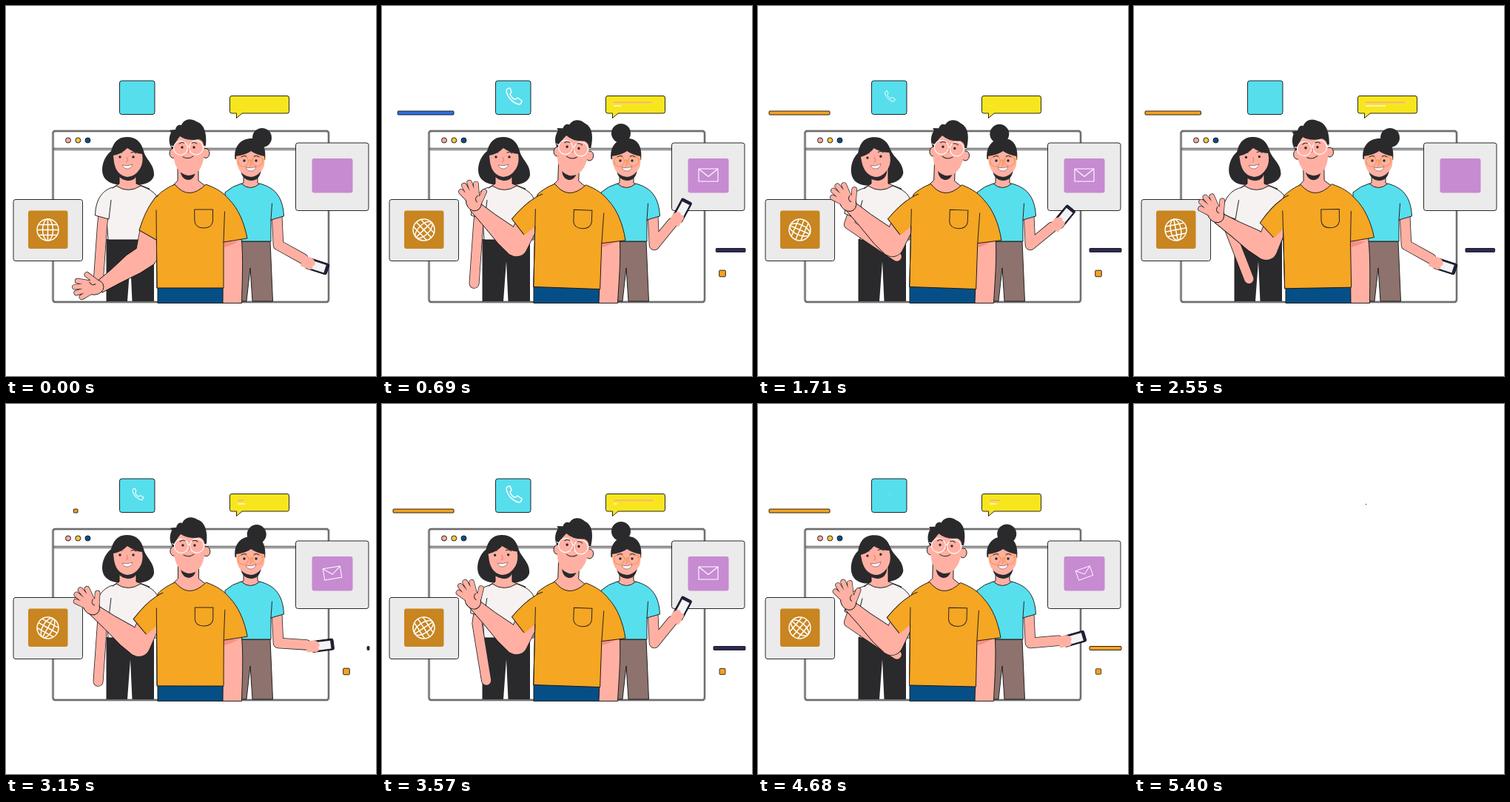
An HTML page for the animation above (5.43 s loop, 500 px wide and 500 px high).

```html
<!DOCTYPE html>
<html lang="en">
<head>
<meta charset="utf-8">
<title>Team greeting</title>
<style>
html, body { margin: 0; width: 100%; height: 100%; overflow: hidden; background: #fff; }
svg { display: block; width: 100vw; height: 100vh; }
.s { fill: #ffb0a3; }
.h { fill: #2a2a2c; }
.o { stroke: #111; stroke-width: .9; stroke-linejoin: round; }
.l { fill: none; stroke: #2a2424; stroke-linecap: round; }
.w { fill: none; stroke: #fff; stroke-width: 1.5; stroke-linejoin: round; }
.thin { stroke-width: 1.1; }
.limb path { fill: none; stroke-linecap: round; stroke-linejoin: round; }
.edge { stroke: #222; }
.skin { stroke: #ffb0a3; }
</style>
</head>
<body>
<svg viewBox="0 0 500 500">
<rect id="dot" x="313" y="135" width="1" height="1"/>
<g id="scene">
  <!-- browser window -->
  <g fill="none">
    <rect x="63.5" y="169" width="372.5" height="231" rx="3" stroke="#333" stroke-width="2.400"/>
    <rect x="63.5" y="169" width="372.5" height="231" rx="3" stroke="#ddd" stroke-width=".7"/>
    <path d="M64 192.300H436M64 194.300H436" stroke="#222" stroke-width=".9"/>
  </g>
  <g class="o">
    <circle cx="84" cy="181.5" r="3.5" fill="#ffa99a"/>
    <circle cx="97.300" cy="181.5" r="3.5" fill="#f5c542"/>
    <circle cx="110.500" cy="181.5" r="3.5" fill="#0a5088"/>
  </g>

  <!-- cards -->
  <g class="o">
    <rect x="10" y="261.500" width="93.500" height="83" rx="3" fill="#ebebeb"/>
    <rect x="391.500" y="185" width="98.500" height="91.500" rx="3" fill="#ebebeb"/>
    <rect x="153.500" y="101" width="47.500" height="45.500" rx="3" fill="#56deed"/>
    <path d="M305 121.500H380Q382.500 121.500 382.500 124V142.500Q382.500 145 380 145H319L311.500 151.500V145H305Q302.500 145 302.500 142.500V124Q302.500 121.500 305 121.500Z" fill="#f7e61e"/>
  </g>
  <rect x="30" y="276.500" width="53.500" height="51.500" rx="3" fill="#c88520"/>
  <rect x="413.500" y="206" width="55" height="46.500" rx="3" fill="#c78bd2"/>
  <g id="globe" class="w">
    <circle r="14.500"/><ellipse rx="7" ry="14.500"/>
    <path d="M0-14.500V14.500M-14.500 0H14.500M-12.500-7H12.500M-12.500 7H12.500"/>
  </g>
  <path id="call" class="w" d="M-10-8C-9 2 0 10 8 11Q11 9 11 6L5 2L2 4.500C-2 3-4 0-5-3L-3-5.500L-5-11Q-9-11-10-8Z"/>
  <path id="mail" class="w thin" d="M-13-8.500H13V8.500H-13ZL0 2L13-8.500"/>
  <rect id="line1" x="313" y="129.500" height="1.600" fill="#f9a98c"/>
  <rect id="line2" x="313" y="134" height="1.800" fill="#fff0c8"/>
  <rect id="bar1" class="o" y="142" height="5" rx="1"/>
  <rect id="bar2" class="o" y="327.500" height="5" rx="1"/>
  <rect id="box" class="o" x="-4.300" y="-4.300" width="8.600" height="8.600" rx="1" fill="#f5a21f"/>

  <!-- woman on the left -->
  <path class="h" d="M135.500 315H200V399H170.500L168 345L164 399H135.500Z"/>
  <path id="hair1" class="h" d="M163 177C150 177 145 186 142 196C132 204 128 218 131 228C135 240 150 243 163 241C180 244 197 241 200 229C201 214 189 208 186 196C183 184 176 177 163 177Z"/>
  <path class="s o" d="M153 218V240L142 247L165 300L194 247L176 240V218Z"/>
  <path class="o" fill="#f5f2f1" d="M149 243Q165 254 182 243C196 248 202 253 205 260V316H138L134 262Q137 249 149 243Z"/>
  <g id="face1"></g>
  <g id="arm1" class="limb">
    <path class="edge" stroke-width="14"/><path class="skin" stroke-width="12.400"/>
  </g>
  <path id="sleeve1" class="o" fill="#f5f2f1" d="M144 245C128 250 121 264 120.500 283L139 288L142 262"/>

  <!-- woman on the right -->
  <circle id="bun" class="h" r="13"/>
  <path fill="#8d726d" class="o" d="M300 318H357L360.500 399H333L330 354L325 399H300Z"/>
  <path class="h" d="M309.500 207C307 189 318 179 332 179C345 179 352 189 350 208Z"/>
  <path class="s o" d="M321 218V239L312 243Q330 262 348 243L340 239V218Z"/>
  <g id="arm2" class="limb">
    <path class="edge" stroke-width="14.500"/><path class="skin" stroke-width="12.900"/>
  </g>
  <g id="hand2">
    <rect class="o" x="-15" y="-8" width="30" height="15" rx="2" fill="#20203e"/>
    <rect x="-10" y="-5.800" width="21" height="11" fill="#f4f4f4"/>
    <path class="s" d="M-22-7Q-10-12-5-5Q-2-1-6 1Q-4 6-9 7L-22 6Z"/>
  </g>
  <path class="o" fill="#57dfee" d="M318 240Q330 251 343 240C361 245 374 255 375.500 284L358 289V318H296V252Q306 243 318 240Z"/>
  <path class="l" d="M358 289L359.500 267"/>
  <g id="face2"></g>

  <!-- man -->
  <path class="o" fill="#054f86" d="M205 376H294V401.500H205Z"/>
  <g id="armRight">
    <path class="s o" d="M293.500 312H318C321 340 319 375 318.500 401.500H293Z"/>
    <path fill="#f98f83" d="M295 318H314Q304 324 295 326Z"/>
  </g>
  <g id="man">
    <path id="hair" class="h" d="M225 194C219 186 220 177 223 171L221 168L229 167C230 161 234 160 237 161C240 153 250 151 257 156C267 159 272 170 270 190Z"/>
    <path class="s o" d="M232 212V236L222 246Q247 266 273 246L260 236V212Z"/>
    <g class="limb">
      <path id="upper" class="edge" stroke-width="31"/>
      <path id="fore" class="s o" style="fill:#ffb0a3" d="M-2-15.500L20-15L50-11L78-8V8L50 11L22 15.500L-2 15.500Z"/>
      <path id="upperIn" class="skin" stroke-width="29.400"/>
    </g>
    <g id="palm"></g>
    <path class="o" fill="#f5a623" d="M228 241Q247 264 270 241C284 246 294 252 302 262C313 273 322 292 326 314L294 319V381H204L203 272Q203 262 205 256Q214 247 228 241Z"/>
    <g id="sleeve">
      <path fill="#f5a623" d="M216 253Q205 255 199 263C189 276 184 290 180 303L204 317L218 290Z"/>
      <path class="l" d="M205 256Q201 259 198 264C189 276 184 290 180 303L203 316"/>
    </g>
    <path class="l" d="M203 276L204 381M295.500 278L294 319M255 275H279.500V291Q278 300 267 300Q256 300 255 291Z"/>
    <g id="face"></g>
  </g>
</g>
</svg>
<script>
const $ = id => document.getElementById(id);
const LOOP = 5430, CYCLE = LOOP / 2;

// brows, eyes and nose centred on x, y with eyes d apart
const features = (x, y, d) => `
  <circle class="h" cx="${x - d}" cy="${y}" r="1.700"/><circle class="h" cx="${x + d}" cy="${y}" r="1.700"/>
  <path class="l" d="M${x - d - 4} ${y - 5}q4-3 7-1M${x + d - 3} ${y - 6}q4-2 7 1"/>
  <path fill="none" stroke="#e8735f" d="M${x} ${y}q3 6-1 7"/>`;
const smile = (x, y) => `<path fill="#fff" stroke="#7b3b35" stroke-width=".6" d="M${x - 7} ${y}q7 2 14-1q-2 6-7 6q-5 0-7-5z"/>`;

$('face1').innerHTML = `
  <path class="h" d="M149 222Q164 232 179 221Q177 237 164 236Q151 234 149 222Z"/>
  <path class="s" d="M145 202Q156 200 164 192Q174 199 184 200Q186 212 181 220Q174 231 164 231Q149 229 146 211Z"/>
  ${features(163, 204, 9)}${smile(164, 215)}`;

$('face2').innerHTML = `
  <path class="h" d="M317 222Q331 232 345 221Q343 236 331 236Q319 235 317 222Z"/>
  <path class="s" d="M311 203Q325 201 331 196Q338 201 349 203Q351 216 345 223Q338 231 331 231Q320 230 315 221Q311 213 311 203Z"/>
  <g fill="none" stroke="#f59a3c" stroke-width="1.200">
    <circle cx="320.500" cy="210" r="7"/><circle cx="340" cy="209.500" r="7"/><path d="M327.500 209q3-2 5 0M347 207l4-1"/>
  </g>
  ${features(330, 209, 8)}${smile(331, 218)}`;

$('face').innerHTML = `
  <path class="h" d="M235 219Q246 229 257 218Q256 235 246 235Q236 234 235 219Z"/>
  <ellipse class="s o" cx="226" cy="199" rx="5" ry="6.500"/><ellipse class="s o" cx="270" cy="199" rx="5" ry="6.500"/>
  <path class="s" d="M226 190Q227 179 237 175Q252 184 263 178Q269 187 268 200Q265 229 246 229Q228 226 226 200Z"/>
  <path class="h" d="M225 193Q222 176 235 169L264 170Q271 180 269 190Q266 181 260 180Q245 183 235 176Q230 182 225 193Z"/>
  <g class="w thin"><circle cx="236" cy="192" r="9.500"/><circle cx="257" cy="191.500" r="9.500"/><path d="M245.500 191q1.500-2 2 0M227 190l-4-1M266 190l4-1"/></g>
  ${features(246, 191, 8)}
  <path class="l" d="M239 204q7 4 14-1"/>`;

const fingers = 'M14-7L25-13M16-3L32-7M17 2L34 1M15 6L30 9M6 8L17 17';
$('palm').innerHTML = `<g class="limb"><path class="edge" stroke-width="7.600" d="${fingers}"/></g>
  <ellipse class="s o" cx="8" rx="13" ry="10.500"/>
  <g class="limb"><path class="skin" stroke-width="6.200" d="${fingers}"/></g>
  <path class="l" d="M6 4q5-3 8 3"/>`;

// eased step from 0 to 1 between a and b
const rise = (p, a, b) => (1 - Math.cos(Math.PI * Math.min(1, Math.max(0, (p - a) / (b - a))))) / 2;
// eased up between a and b, held, eased down between c and d
const pulse = (p, a, b, c, d) => rise(p, a, b) - rise(p, c, d);
const polar = (x, y, r, deg) => [x + r * Math.cos(deg * Math.PI / 180), y + r * Math.sin(deg * Math.PI / 180)];
const move = (id, v) => $(id).setAttribute('transform', v);
const limb = (id, d) => { for (const e of $(id).children) e.setAttribute('d', d); };

function bar(id, right, size, p, color) {
  const grow = p < 900 ? rise(p, 370, 760) : rise(p, 900, 1450);
  const width = size * (grow - rise(p, 2520, 2690));
  const e = $(id);
  e.setAttribute('x', right - size * grow);
  e.setAttribute('width', width);
  e.setAttribute('fill', color);
  e.style.display = width > .5 ? '' : 'none';
}

function drawMan(p) {
  const tilt = 2 * pulse(p, 380, 690, 1650, 2450) - pulse(p, 2200, 2500, 2550, CYCLE);
  const up = pulse(p, 0, 500, 2510, CYCLE);
  const wave = 22 + 10 * Math.cos(8 * Math.PI * p / CYCLE);
  const ex = 190 - 11 * up, ey = 337 - 11 * up, angle = 146 + 75 * up;
  const head = `rotate(${tilt * 3} 247 236)`;
  move('man', `rotate(${tilt} 249 401)`);
  move('armRight', `translate(0 401) skewX(${-tilt}) translate(0 -401)`);
  move('hair', head);
  move('face', head);
  move('sleeve', `rotate(${21 * up} 210 274)`);
  for (const id of ['upper', 'upperIn']) $(id).setAttribute('d', `M${196 - 7 * up} 304L${ex} ${ey}`);
  move('fore', `translate(${ex} ${ey}) rotate(${angle})`);
  move('palm', `translate(${polar(ex, ey, 76, angle)}) rotate(${angle + wave})`);
}

function drawLeft(p) {
  const bend = pulse(p, 700, 1200, 2350, CYCLE);
  const head = `translate(${-2 * bend}) rotate(${-6 * bend} 163 243)`;
  move('hair1', head);
  move('face1', head);
  const ex = 130 - 7 * bend, ey = 297 - 2 * bend;
  limb('arm1', `M133 266L${ex} ${ey}L${polar(ex, ey, 78, 94 - 60 * bend)}`);
  move('sleeve1', `rotate(${bend * 8} 138 256)`);
}

function drawRight(p) {
  const up = pulse(p, 280, 690, 1500, 2350);
  const angle = 29 - 80 * up;
  move('bun', `translate(${346 - 23 * up} ${178 - 6 * up})`);
  limb('arm2', `M366 280L368 323L${polar(368, 323, 38, angle)}`);
  move('hand2', `translate(${polar(368, 323, 60, angle)}) rotate(${angle - 11})`);
}

function drawIcons(p, t) {
  const mail = pulse(p, 0, 550, 1750, 2450);
  move('globe', `translate(56.500 302.500) rotate(${180 * p / CYCLE})`);
  move('call', `translate(178 122) scale(${pulse(p, 0, 690, 1450, 2100)})`);
  move('mail', `translate(441 228.500) rotate(${90 * (mail - 1)}) scale(${mail})`);
  move('box', `translate(460 361.500) scale(${pulse(p, 150, 400, 800, 1100) + pulse(p, 1100, 1750, 1800, 2450)})`);
  $('line1').setAttribute('width', 54 * (pulse(p, 330, 750, 1100, 1650) + pulse(p, 1710, 2450, 2560, CYCLE)));
  $('line2').setAttribute('width', 10 * pulse(p, 330, 435, 690, 1000) + 27 * pulse(p, 1640, 2450, 2560, CYCLE));
  bar('bar1', 97, 82, p, t < 900 ? '#2f6fe4' : '#f5a21f');
  bar('bar2', 491, 43, p, t < CYCLE + 900 ? '#2b2a55' : '#f5a21f');
}

function draw(now) {
  const t = now % LOOP, p = t % CYCLE, blank = t >= 5400;
  $('scene').style.display = blank ? 'none' : '';
  $('dot').style.display = blank ? '' : 'none';
  drawMan(p);
  drawLeft(p);
  drawRight(p);
  drawIcons(p, t);
}

const start = performance.now();
(function frame() {
  draw(performance.now() - start);
  requestAnimationFrame(frame);
})();
</script>
</body>
</html>
```
